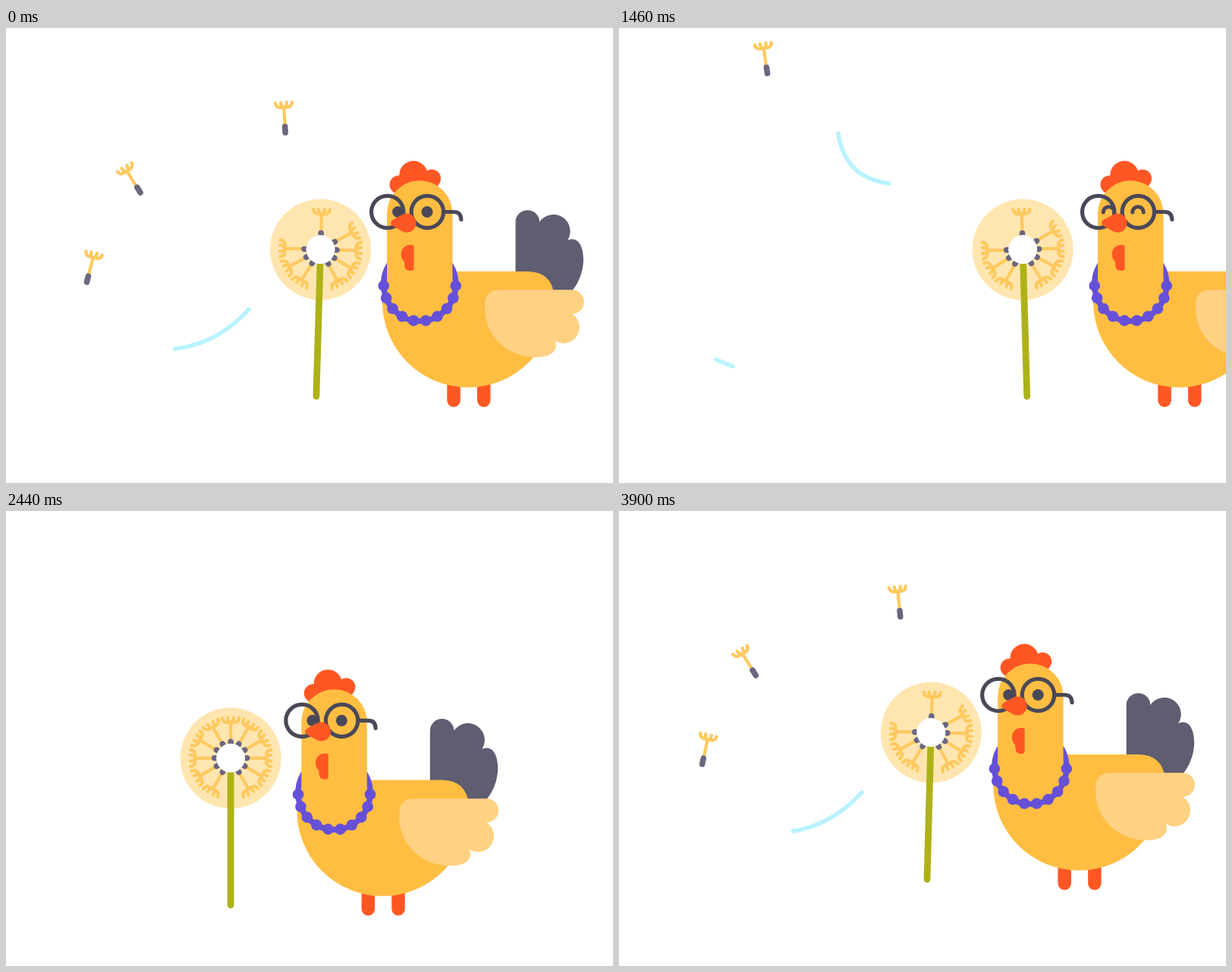
Write an HTML page with a canvas that moves like this. It is 800x600 px and loops after 3920 ms.

```html
<!DOCTYPE html>
<html lang="en">
<head>
<meta charset="utf-8">
<title>Hen and dandelion</title>
<style>
html, body { margin: 0; width: 100%; height: 100%; overflow: hidden; background: #fff; }
canvas { display: block; width: 800px; height: 600px; }
</style>
</head>
<body>
<canvas id="stage" width="800" height="600"></canvas>
<script>
const ctx = document.getElementById('stage').getContext('2d');
const LOOP = 3920, START = 2800, RELEASE = 3180;
const REST = 465, HOME = 590;
const TAU = Math.PI * 2, RAD = Math.PI / 180;
const C = {
  body: '#ffbe42', wing: '#ffd182', red: '#ff5724', dark: '#5f5d70', frame: '#4a4858',
  beads: '#6650d8', disc: '#ffe6b0', seed: '#ffc95f', pod: '#6b667e', stem: '#aeb219', wind: '#b8f3ff'
};

// Loose seeds: slot on the head, place and speed (px/ms) at the loop point, sway
const FLYERS = [
  { slot: 30, x: 368, y: 118, vx: -.12, vy: -.053, period: 1500, phase: -6 },
  { slot: -30, x: 167, y: 200, vx: -.167, vy: .037, period: 1900, phase: -90 },
  { slot: -60, x: 111, y: 316, vx: -.111, vy: .068, period: 1900, phase: 26 }
];

const GUSTS = [
  { at: 3600, span: 820, from: [320, 371], to: [190, 424], bend: .24 },
  { at: 3940, span: 545, from: [346, 403], to: [277, 335], bend: .25 },
  { at: 4310, span: 1130, from: [320, 407], to: [128, 437], bend: .34 },
  { at: 5100, span: 560, from: [356, 205], to: [289, 139], bend: .38 },
  { at: 5640, span: 440, from: [360, 97], to: [243, 139], bend: .26 }
];

// Motion rules
const ramp = (u, a, b) => Math.max(0, Math.min(1, (u - a) / (b - a)));
const smooth = (u, a, b) => { const k = ramp(u, a, b); return k * k * (3 - 2 * k); };
const wave = (u, period, phase) => Math.sin(TAU * (u - LOOP) / period + phase * RAD);

// Flat-ended bezier easing with horizontal handles at x1 and x2
function ease(k, x1, x2) {
  let lo = 0, hi = 1, s = .5;
  for (let i = 0; i < 24; i++) {
    s = (lo + hi) / 2;
    const x = 3 * (1 - s) * s * ((1 - s) * x1 + s * x2) + s * s * s;
    if (x < k) lo = s; else hi = s;
  }
  return s * s * (3 - 2 * s);
}

const pan = u => REST + 256 * Math.sin(ramp(u, 3125, 5575) * Math.PI / 2);
const lift = u => ease(ramp(u, 5560, 6720), .576, .041);
const lean = u => smooth(u, 2880, 3080) - smooth(u, 3140, 3330);
const tilt = u => (.4 + 2.2 * wave(u, 2060, 35)) * smooth(u, RELEASE, 3600);

// Drawing helpers
function disc(x, y, r, color) {
  ctx.fillStyle = color;
  ctx.beginPath();
  ctx.arc(x, y, r, 0, TAU);
  ctx.fill();
}

function fill(path, color) {
  ctx.fillStyle = color;
  ctx.fill(new Path2D(path));
}

function stroke(path, color, width) {
  ctx.strokeStyle = color;
  ctx.lineWidth = width;
  ctx.stroke(new Path2D(path));
}

function group(draw) {
  ctx.save();
  draw();
  ctx.restore();
}

function turn(x, y, deg) {
  ctx.translate(x, y);
  ctx.rotate(deg * RAD);
  ctx.translate(-x, -y);
}

// Seed pointing up, its pod ending at the origin
function seed() {
  stroke('M0-12V-38M-11-43.5C-10-36-4-37.5 0-37.5S10-36 11-43.5M-4-44Q-3.8-40-2.5-38M4-44Q3.8-40 2.5-38', C.seed, 4.2);
  stroke('M0-4V-12', C.pod, 7.5);
}

function flower(deg, full) {
  group(() => {
    turn(408.8, 488, deg);
    ctx.translate(408.8, 292);
    disc(0, 0, 66.5, C.disc);
    for (let a = -150; a < 180; a += 30) {
      if (!full && FLYERS.some(f => f.slot === a)) continue;
      group(() => {
        ctx.rotate(a * RAD);
        ctx.translate(0, -9.5);
        seed();
      });
    }
    stroke('M0 13V193.7', C.stem, 8.8);
    disc(0, 0, 19, '#fff');
  });
}

function necklaceArc(from, to) {
  ctx.strokeStyle = C.beads;
  ctx.lineWidth = 7.5;
  ctx.beginPath();
  ctx.ellipse(545.2, 338, 47.5, 48.5, 0, from, to);
  ctx.stroke();
}

function head(shut) {
  necklaceArc(Math.PI, TAU);
  disc(537, 194, 18.7, C.red);
  disc(517.5, 206.5, 12, C.red);
  disc(561, 198.5, 12, C.red);
  fill('M511 216L525 200H558L570 207L545 230Z', C.red);
  fill('M502 375V244.5a43.2 43.2 0 0 1 86.4 0V375Z', C.body);

  necklaceArc(0, Math.PI);
  for (let i = -4.5; i <= 4.5; i++) {
    const a = i * 19.5 * RAD;
    disc(545.2 + 47.5 * Math.sin(a), 338 + 48.5 * Math.cos(a), 7.3, C.beads);
  }

  for (const x of [516.5, 555]) {
    if (shut) stroke(`M${x - 7.3} 243a7.3 7.3 0 0 1 14.6 0`, C.frame, 5);
    else disc(x, 242.5, 7.5, C.frame);
  }
  for (const x of [502.7, 555.3]) {
    stroke(`M${x - 21.2} 242.5a21.2 21.2 0 1 1 42.4 0a21.2 21.2 0 1 1 -42.4 0`, C.frame, 5.2);
  }
  stroke('M577 242.5H590Q599.5 242.5 599.8 252.5', C.frame, 5.2);

  fill('M510 252.7L522 246.2A12.5 12.5 0 1 1 522 268L510 261.3Q504 257 510 252.7Z', C.red);
  fill('M532 286H535Q537.5 286 537.5 289V317Q537.5 320 534 320H531Q524.5 320 525 308C518 303 519 287 532 286Z', C.red);
}

function hen(back, shut) {
  const tipped = draw => group(() => { turn(521, 479, back * 3.9); draw(); });
  stroke('M590 460V491M629.7 460V491', C.red, 17.5);
  tipped(() => {
    fill('M671.5 350V256a15.8 15.8 0 0 1 31.6 0A21.3 21.3 0 0 1 740 280C754 274 761 288 761 306Q760 331 744 349Z', C.dark);
    fill('M510 321H688Q719 322 722.3 352L722 361A113 113 0 0 1 496 361Q497 340 510 321Z', C.body);
  });
  group(() => {
    turn(545, 401, back * 9.3);
    head(shut);
  });
  tipped(() => fill('M651 345.3H746a15.8 15.8 0 0 1 0 31.6A19.7 19.7 0 0 1 723.5 412.5C728 424 721 434 698 434.2C660 434 631 405 631 370V365Q631 345.3 651 345.3Z', C.wing));
}

function scene(x, y, deg, full, back, shut) {
  group(() => {
    ctx.translate(x - HOME, y);
    flower(deg, full);
    hen(back, shut);
  });
}

// Each loose seed leaves its slot and settles onto a straight drift.
function flyer(u, f) {
  const since = RELEASE - LOOP, a = f.slot * RAD;
  const pull = (1 - ramp(u, RELEASE, RELEASE + 800)) ** 2;
  const slotX = 291 + 33 * Math.sin(a), slotY = 292 - 33 * Math.cos(a);
  const x = f.x + f.vx * (u - LOOP) + (slotX - f.x - f.vx * since) * pull;
  const y = f.y + f.vy * (u - LOOP) + (slotY - f.y - f.vy * since) * pull;
  const sway = 32 * wave(u, f.period, f.phase);
  group(() => {
    ctx.translate(x, y);
    ctx.rotate((f.slot + (sway - f.slot) * ramp(u, RELEASE, 3500)) * RAD);
    ctx.translate(0, 23.5);
    seed();
  });
}

// A bowed line that grows from its start, then shrinks into its end
function gust(u, { at, span, from: [x0, y0], to: [x1, y1], bend }) {
  if (u <= at || u >= at + span) return;
  const tip = ramp(u, at, at + span / 2), tail = ramp(u, at + span / 2, at + span);
  const cx = (x0 + x1) / 2 + (y1 - y0) * bend, cy = (y0 + y1) / 2 - (x1 - x0) * bend;
  const mix = (a, b, c, s) => (1 - s) * ((1 - s) * a + 2 * s * b) + s * s * c;
  ctx.strokeStyle = C.wind;
  ctx.lineWidth = 5.6;
  ctx.beginPath();
  for (let i = 0; i <= 30; i++) {
    const s = tail + (tip - tail) * i / 30;
    ctx.lineTo(mix(x0, cx, x1, s), mix(y0, cy, y1, s));
  }
  ctx.stroke();
}

function render(ms) {
  const t = ms % LOOP, u = t < START ? t + LOOP : t;
  const p = lift(u), rise = -700 * p, flown = u >= RELEASE;
  const shut = (u > 2930 && u < 3200) || (u > 4960 && u < 5580);
  ctx.fillStyle = '#fff';
  ctx.fillRect(0, 0, 800, 600);
  ctx.lineCap = ctx.lineJoin = 'round';
  for (const g of GUSTS) gust(u, g);
  if (p < .8) {
    scene(pan(u) - 226 * p, rise, tilt(u), !flown, lean(u), shut);
    if (flown) group(() => {
      ctx.translate(0, rise);
      for (const f of FLYERS) flyer(u, f);
    });
  }
  if (p > 0) scene(REST + 255 * (1 - p), 700 + rise, 0, true, 0, false);
}

const began = performance.now();
function tick() {
  render(performance.now() - began);
  requestAnimationFrame(tick);
}
tick();
</script>
</body>
</html>
```
